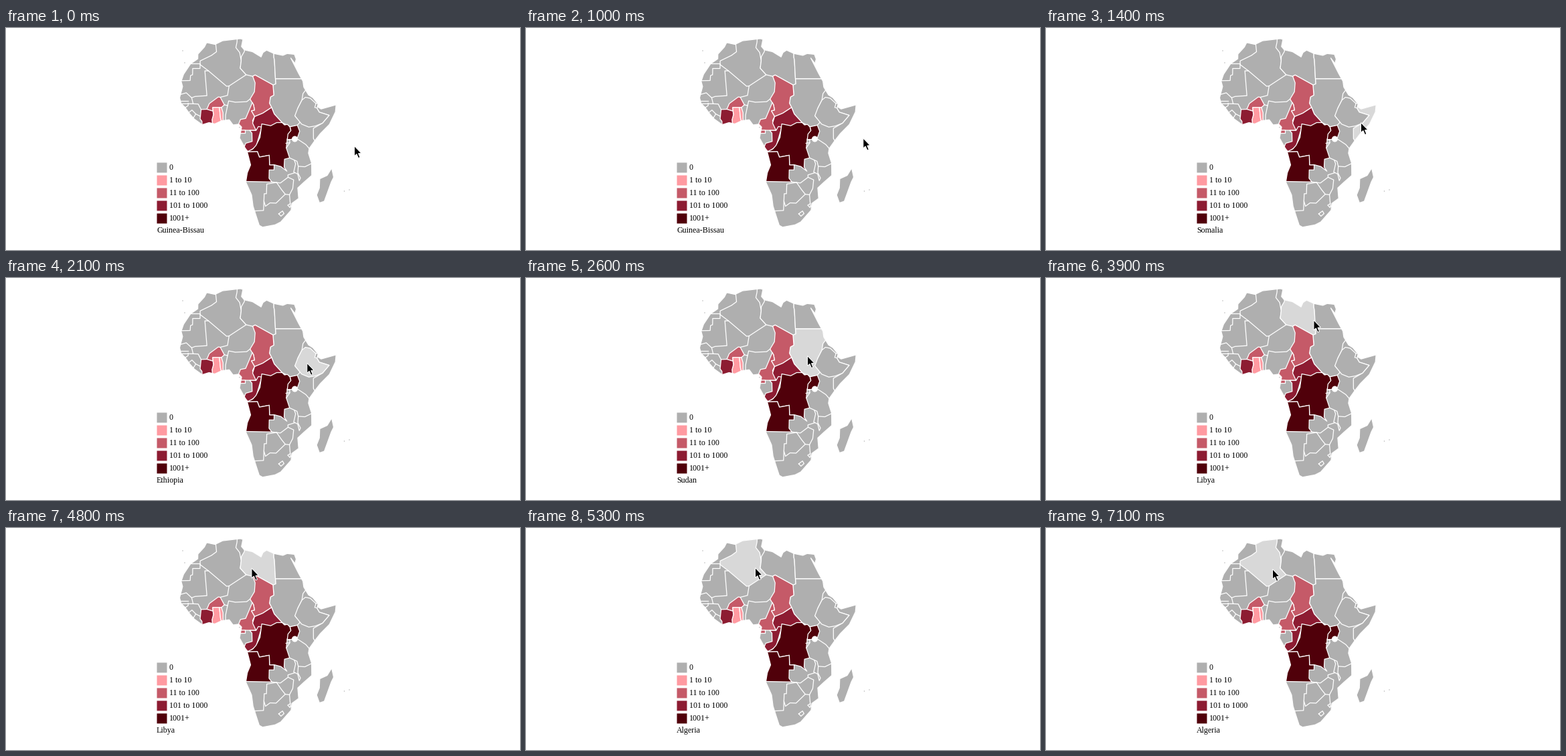
A matplotlib script for the animation above (7.2 s loop, 768x332 px).

```python
import numpy as np
import matplotlib.pyplot as plt
from matplotlib.animation import FuncAnimation
from matplotlib.patches import Circle, Polygon, Rectangle

W, H, DPI = 768, 332, 100
STEP, LOOP = 100, 7200
PX = 72 / DPI
SHADES = ["#afafaf", "#ff9aa1", "#c55a68", "#8d1c32", "#50000a"]
RANGES = ["0", "1 to 10", "11 to 100", "101 to 1000", "1001+"]
LIGHT = "#d8d8d8"
EDGE = dict(color="white", lw=1.25 * PX)

fig = plt.figure(figsize=(W / DPI, H / DPI), dpi=DPI, facecolor="white")
ax = fig.add_axes([0, 0, 1, 1])
ax.set_xlim(0, W)
ax.set_ylim(H, 0)
ax.axis("off")


def project(coords):
    """Kavrayskiy VII projection of lon, lat, lon, lat, ... to pixels."""
    lon, lat = np.array(coords).reshape(-1, 2).T
    x = 318.8 + 3.428 * lon * np.sqrt(1 - 3 * (lat / 180) ** 2)
    return np.column_stack([x, 161.8 - 3.91 * lat])


def border(*coords):
    ax.plot(*project(coords).T, solid_joinstyle="round", zorder=2, **EDGE)


def coast(*coords):
    """Grey land mass; its white rim covers whatever is clipped to it."""
    shape = Polygon(project(coords), fc=SHADES[0], ec="none")
    border(*coords, *coords[:2])
    return ax.add_patch(shape)


def land(level, *coords):
    """Region cut off at the coast, so its sea side may be loose."""
    shape = Polygon(project(coords), fc=SHADES[level], ec="white",
                    lw=EDGE["lw"], joinstyle="round")
    ax.add_patch(shape)
    shape.set_clip_path(africa)
    return shape


def text(x, y, s):
    return ax.text(x, y, s, family="Liberation Serif", size=12 * PX)


africa = coast(
    -5.9, 35.8, -2, 35.1, 1.5, 36.5, 9.8, 37.3, 11, 37, 10.2, 34.3, 11.5, 33,
    15.2, 32.3, 19, 30.3, 20, 32, 21.7, 32.9, 25, 31.6, 29, 30.9, 31, 31.6,
    34.3, 31.3, 34.9, 29.5, 34.2, 27.8, 32.5, 29.9, 35.5, 24, 37.2, 21,
    37.4, 18.8, 39.3, 15.8, 41.2, 14.7, 43.3, 12.3, 43, 11.3, 44.6, 10.4,
    51.2, 12, 50.8, 9.3, 48, 4.5, 44, 1, 41.6, -1.7, 39.2, -4.7, 38.9, -6.5,
    40.4, -10.3, 40.7, -15, 37.4, -17.6, 34.8, -19.8, 35.5, -23.8, 32.6, -25.7,
    32.5, -28.3, 28.2, -32.8, 25.7, -33.9, 20, -34.8, 18.4, -34.1, 15.2, -26.8,
    14.4, -22.5, 11.7, -17.5, 12.3, -14, 13.7, -11, 12.2, -6, 8.8, -0.7,
    9.7, 3.5, 8.5, 4.6, 6, 4.3, 4.3, 6.3, 1, 5.9, -2, 4.7, -4.5, 5.2,
    -7.5, 4.4, -11, 6.6, -13.2, 8.8, -15, 11, -16.8, 12.5, -17.5, 14.7,
    -16.3, 19, -17, 21, -16, 23.7, -13, 27.7, -9.8, 29.6, -9.8, 31.4, -6.9, 34.1)
coast(49.3, -12.2, 50.4, -15.7, 49.5, -17.5, 47.1, -24.9, 45, -25.5,
      43.4, -22.5, 44.4, -19.8, 44.3, -16.3, 47.5, -15)

# Regions that light up under the pointer
algeria = land(0, -8.7, 27.4, -8.7, 28.8, -3.6, 30.9, -1.3, 32.3, -2.2, 39,
               8.5, 39, 8.2, 36, 7.6, 33.9, 9.3, 32, 9.9, 28.8, 9.4, 26,
               12, 23.5, 4.3, 19.2, 3.2, 19.1, -4.9, 25)
sudan = land(0, 25, 22, 40, 22, 38.5, 18, 36.9, 16.3, 36.3, 13.8, 34.3, 10.6,
             34.1, 8.6, 33, 7.8, 35.3, 5.4, 34, 4.2, 31, 3.6, 27.4, 5.2,
             24, 8.5, 22.9, 11, 22, 12.6, 22.5, 15, 24, 15.7, 23.8, 20, 25, 20)
libya = land(0, 25, 20, 25, 29.2, 24.8, 30.2, 25.2, 35, 11.5, 35, 11.5, 32.4,
             10, 30.4, 9.9, 28.8, 9.4, 26, 12, 23.5, 14.9, 22.9, 16, 23.4,
             23.8, 19.6)
egypt = land(0, 25, 22, 25, 29.2, 24.8, 30.2, 25.2, 35, 38, 35, 38, 22)
somalia = land(0, 42.7, 10.8, 44, 12, 54, 14, 54, -3, 41.6, -1.7, 41, -0.9,
               41, 3, 45, 5, 48, 8, 43.7, 9.2)
ethiopia = land(0, 36.3, 13.8, 37.9, 14.9, 40, 14.5, 42.4, 12.5, 41.8, 11,
                42.7, 10.8, 43.7, 9.2, 48, 8, 45, 5, 41.9, 3.9, 39, 3.5,
                35.9, 4.6, 33, 7.8, 34.3, 10.6)

# Shaded regions
land(2, 14.9, 22.9, 16, 23.4, 23.8, 19.6, 24, 15.7, 22.5, 15, 22, 12.6,
     22.9, 11, 19, 8.8, 15.4, 7.5, 14, 9.7, 15.4, 10, 15, 12, 13.5, 14.2,
     15.5, 17, 15.9, 20.4)
land(2, 9.5, 2.3, 8.3, 4.4, 9.2, 6.4, 11.5, 6.8, 14.5, 12.9, 15, 12, 15.4, 10,
     14, 9.7, 15.4, 7.5, 14.5, 6, 16, 2.2)
land(3, 14.5, 5, 15.4, 7.5, 19, 8.8, 22.9, 11, 24, 8.5, 27.4, 5.2, 22.4, 3.8,
     18.5, 3.5, 16, 2.2)
land(3, 10.8, -4.2, 12.6, -6, 16, -4, 18.5, 3.5, 17, 3.7, 16, 2.2, 13.2, 2.2,
     14.2, 1.2, 14.3, -2, 11.5, -2.7)
land(2, 9, 2.3, 11.3, 2.3, 11.3, 1.1, 9, 1.1)
land(4, 30.8, 3.5, 31.2, 2.2, 29.6, -1, 29.2, -4.5, 30.7, -8.3, 28.5, -8.8,
     28.4, -11.8, 29.7, -13.4, 27, -11.6, 23.9, -10.9, 22, -11, 21.8, -7.3,
     17.5, -8, 16.6, -5.9, 12, -6, 14.6, -4.9, 16, -3.5, 17.7, -0.5, 18.5, 4.7,
     22.4, 4, 25, 5.2, 27.4, 5.2, 28.4, 4.3, 29.7, 4.5)
land(4, 11, -6, 16.6, -5.9, 17.5, -8, 21.8, -7.3, 22, -11, 24, -11, 24, -12.9,
     21.9, -12.9, 21.9, -16.1, 23.2, -17.5, 11, -17.3)
land(4, 34, 4.2, 35, 1.9, 33.9, -0.9, 29.6, -1.4, 29.9, 0.8, 31.2, 2.2, 30.8, 3.6)
land(2, -5.5, 10.3, -4.4, 12.5, -0.5, 15, 0.4, 14.9, 2.2, 12, 0.9, 11, -2.9, 11,
     -2.8, 9.6)
land(1, -2.9, 11, 0, 11, 0.5, 6.9, 1.1, 5, -2.9, 4, -3.2, 6.3, -2.6, 8.2)
land(1, 0, 11, 0.9, 11, 1.6, 9, 1.6, 5, 1.1, 5, 0.5, 6.9)
land(3, -8, 10.2, -5.5, 10.3, -2.8, 9.6, -2.6, 8.2, -3.2, 6.3, -2.9, 4, -7.5, 4,
     -7.6, 5.7, -8.4, 6.6)

# Remaining borders, north-west to south
border(-14, 27.7, -8.7, 27.7, -8.7, 25.9, -12, 25.9, -12, 23.5, -12.9, 23.2,
       -13, 21.3, -18, 21.2)
border(-4.9, 25, -6.5, 25, -5.5, 15.5, -10.7, 15.2, -12.2, 14.7)
border(-17, 16, -14.6, 16.6, -12.2, 14.7, -11.5, 12.4, -17, 12.4)
border(-11.5, 12.4, -9.3, 12.3, -8, 10.2)
border(-17, 13.4, -13.8, 13.4)
border(-13.7, 12.6, -13.7, 11.7, -15.2, 10.8)
border(-13.4, 9, -12, 10, -10.3, 8.5, -11.5, 6.8)
border(-10.3, 8.5, -8.3, 7.6)
border(0.4, 14.9, 3.6, 15.6, 4.3, 19.2)
border(2.7, 6, 2.7, 8, 3.6, 11.7, 4.1, 13.5, 7, 13, 12, 13.2, 13.5, 14.2)
border(2.2, 12, 3.6, 11.7)
border(42.4, 12.5, 43.3, 12.7)
border(33.9, -1, 37.7, -3.2, 39.5, -5)
border(29.6, -1.4, 30.6, -1.2, 30.7, -2.5, 29.2, -4.5)
border(29, -2.7, 30.7, -2.5)
border(30.7, -8.3, 34, -9.6, 34.6, -11.5, 37.5, -11.7, 40.5, -10.4)
border(32.8, -9.2, 33.4, -10.6, 32.7, -13.7, 34.5, -14.5, 35.3, -17, 35.8, -16,
       34.5, -14, 34.6, -11.5)
border(33.2, -14, 30.2, -14.8, 30.3, -15.7, 27, -17.9, 23.2, -17.5)
border(30.3, -15.7, 32.8, -16.7, 32.6, -20, 31.3, -22.4, 31.9, -25.8,
       32.1, -26.8, 33, -26.8)
border(25.3, -17.7, 27.7, -20.5, 29.4, -22.2, 31.3, -22.4)
border(29.4, -22.2, 25.5, -25.6, 22.8, -25.5, 20.8, -26.8, 20, -24.8)
border(16, -28.6, 20, -28.4, 20, -22, 21, -22, 21, -18.3, 25.3, -17.7)
border(31.9, -25.8, 30.8, -26.4, 31.9, -27.3, 32.1, -26.8)
border(27, -29.7, 28.6, -28.6, 29.4, -29.6, 28.1, -30.6, 27, -29.7)

ax.add_patch(Circle((431.5, 166), 4.5, fc="white", ec="none", zorder=3))
for x, y in [(264, 34), (267, 52), (349, 148.5), (505.5, 244), (513, 242)]:
    ax.add_patch(Circle((x, y), 0.7, fc=SHADES[0], ec="none"))

for i, (shade, label) in enumerate(zip(SHADES, RANGES)):
    ax.add_patch(Rectangle((225.5, 201.4 + 19 * i), 15, 15, fc=shade, ec="none",
                           snap=False))
    text(244, 212 + 19 * i, label)
caption = text(225, 306, "")

ARROW = np.array([(0, 0), (0, 15), (3.4, 12), (6, 18), (8.5, 17), (6, 11.2),
                  (10.4, 10.8)])
cursor = ax.add_patch(Polygon(ARROW, fc="black", ec="white", lw=PX, zorder=5))

# Pointer stops: time, x, y
STOPS = np.array([
    (800, 520, 176), (1400, 470, 141), (1700, 461, 131), (1900, 461, 131),
    (2600, 420, 116), (2700, 420, 116), (3300, 414, 69), (3500, 413, 65),
    (4300, 386, 60), (4400, 386, 60), (5300, 342, 59), (5600, 338, 61)])
HOVERS = [(0, "Guinea-Bissau", None), (1400, "Somalia", somalia),
          (1500, "Ethiopia", ethiopia), (2300, "Sudan", sudan),
          (3300, "Egypt", egypt), (3900, "Libya", libya),
          (5300, "Algeria", algeria)]


def draw(frame):
    t = frame * STEP
    tip = [np.interp(t, STOPS[:, 0], STOPS[:, k]) for k in (1, 2)]
    cursor.set_xy(ARROW + tip + np.array([0.5, 0.5]))
    _, name, active = [h for h in HOVERS if h[0] <= t][-1]
    caption.set_text(name)
    for _, _, shape in HOVERS[1:]:
        shape.set_facecolor(LIGHT if shape is active else SHADES[0])
    return []


anim = FuncAnimation(fig, draw, frames=LOOP // STEP, interval=STEP, repeat=True,
                     repeat_delay=0)
plt.show()
```
